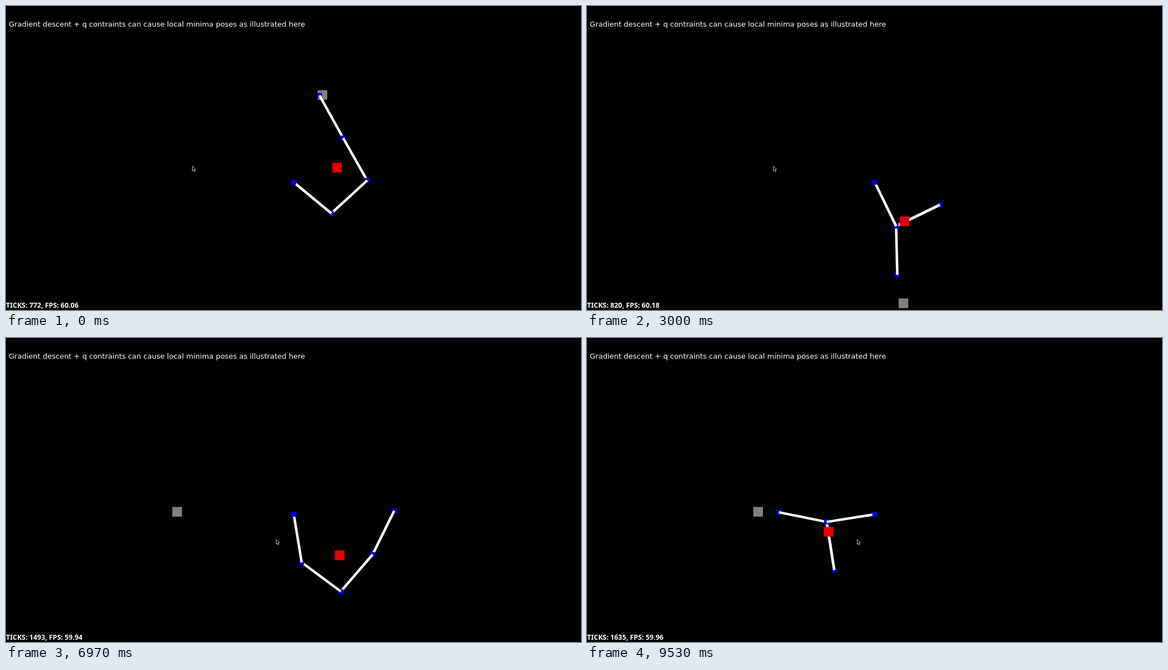
Animation of 1029 by 544 pixels, one loop 9.56 s. Source, as an HTML page with a canvas:

```html
<!DOCTYPE html>
<html lang="en">
<head>
<meta charset="utf-8">
<style>
  html, body { margin: 0; width: 100%; height: 100%; overflow: hidden; background: #000; }
  canvas { display: block; }
</style>
</head>
<body>
<canvas id="stage" width="1029" height="544"></canvas>
<script>
const ctx = document.getElementById('stage').getContext('2d');
const LOOP = 9560, STEP = 100 / 3, CUT = 141, LAST_TICK = 150;
const BASE = [515, 315.5], LINK = 87.2, RAD = Math.PI / 180;
const GAIN = 5.9e-6 / RAD, MAX_TURN = 0.06 / RAD;
const LIMITS = [[-360, 360], [-90, 0], [-180, 0], [-90, 1]];
const GOAL_SPEED = 0.189;
const CAPTION = 'Gradient descent + q contraints can cause local minima poses as illustrated here';

// keys: joint angles in degrees at a few ticks; the solver fills in the rest
const scenes = [
  {
    tick: 772, resume: 66, cursor: [333, 285.5],
    from: [566.3, 159.2], to: [566.3, 532], start: 100,
    keys: [
      { at: 0, q: [39.6, -82.2, -77, 0.6] },
      { at: 10, q: [51.2, -90, -111.7, -33.6] },
      { at: 98, q: [72, -90, -180, -79.3] }
    ]
  },
  {
    tick: 1493, resume: 215, cursor: [483, 359.5],
    from: [693, 311], to: [306.3, 311], start: 4915,
    keys: [
      { at: 0, q: [80.7, -44.1, -85.8, -14.5] },
      { at: 8, q: [75, -71.6, -113.3, -42] },
      { at: 46, q: [149, -90, -180, -38] },
      { at: 142, q: [171, -90, -180, -69.6] }
    ]
  }
];

const mix = (a, b, f) => a + (b - a) * f;
const clamp = (v, lo, hi) => Math.max(lo, Math.min(hi, v));
const limit = q => q.map((v, i) => clamp(v, ...LIMITS[i]));

function armPoints(q) {
  const points = [BASE];
  let angle = 0;
  for (const turn of q) {
    angle += turn * RAD;
    const [x, y] = points[points.length - 1];
    points.push([x + LINK * Math.cos(angle), y + LINK * Math.sin(angle)]);
  }
  return points;
}

// One step of gradient descent on the squared distance from tip to goal
function descend(q, goal) {
  const points = armPoints(q);
  const [tx, ty] = points[4];
  const ex = goal[0] - tx, ey = goal[1] - ty;
  return limit(q.map((v, i) => {
    const [x, y] = points[i];
    const slope = (tx - x) * ey - (ty - y) * ex;
    return v + clamp(slope * GAIN, -MAX_TURN, MAX_TURN);
  }));
}

// Descend from each key and spread the remaining gap to the next one evenly
function solve({ keys, to }) {
  const path = [];
  keys.forEach((key, k) => {
    const next = keys[k + 1];
    const count = (next ? next.at : LAST_TICK) - key.at;
    const run = [key.q];
    for (let i = 0; i < count; i++) run.push(descend(run[i], to));
    const gap = run[count].map((v, j) => next ? next.q[j] - v : 0);
    for (let i = 0; i < count; i++) {
      path.push(limit(run[i].map((v, j) => v + gap[j] * i / count)));
    }
  });
  return path;
}
scenes.forEach(scene => scene.path = solve(scene));

// Mean of the link midpoints
function massCentre(points) {
  return [0, 1].map(n => points.slice(1)
    .reduce((sum, p, i) => sum + (p[n] + points[i][n]) / 2, 0) / 4);
}

function goalAt({ from, to, start }, time) {
  const span = Math.hypot(to[0] - from[0], to[1] - from[1]);
  const f = clamp((time - start) * GOAL_SPEED / span, 0, 1);
  return from.map((v, n) => mix(v, to[n], f));
}

// A slightly noisy reading, refreshed every five steps
function fps(step) {
  const slot = Math.floor(step / 5);
  return (60.06 + 0.12 * Math.sin(slot * 12.9898)).toFixed(2);
}

function square([x, y], size, color) {
  ctx.fillStyle = color;
  ctx.fillRect(x - size / 2, y - size / 2, size, size);
}

// From the tip inwards, each link is covered by the joint it starts from
function drawArm(points) {
  ctx.strokeStyle = '#fff';
  ctx.lineWidth = 4.5;
  for (let i = 4; i >= 0; i--) {
    square(points[i], 8.7, '#0000f0');
    if (i === 0) break;
    ctx.beginPath();
    ctx.moveTo(...points[i - 1]);
    ctx.lineTo(...points[i]);
    ctx.stroke();
  }
}

function label(text, x, y, font) {
  ctx.font = font;
  ctx.fillStyle = '#fff';
  ctx.fillText(text, x, y);
}

const arrow = new Path2D('M.5 .8V9.6L2.5 7.7L3.8 10.8L5.2 10.2L3.9 7.2H6.4Z');

function drawCursor([x, y]) {
  ctx.save();
  ctx.translate(x, y);
  ctx.lineWidth = 1;
  ctx.strokeStyle = '#b8b8b8';
  ctx.stroke(arrow);
  ctx.restore();
}

function draw(time) {
  const step = Math.floor((time + 3.4) / STEP);
  const scene = scenes[step < CUT ? 0 : 1];
  const ticks = Math.max(0, step - scene.resume) * 2;
  const points = armPoints(scene.path[ticks]);

  ctx.fillStyle = '#000';
  ctx.fillRect(0, 0, 1029, 544);
  square(goalAt(scene, step * STEP), 17.3, '#808080');
  drawArm(points);
  square(massCentre(points), 17.3, '#e60000');

  label(CAPTION, 5, 36.5, '13px "DejaVu Sans", sans-serif');
  label(`TICKS: ${scene.tick + ticks}, FPS: ${fps(step)}`, 0, 540,
    'bold 12.4px "Noto Sans", sans-serif');
  drawCursor(scene.cursor);
}

const begin = performance.now();
function frame() {
  draw((performance.now() - begin) % LOOP);
  requestAnimationFrame(frame);
}
frame();
</script>
</body>
</html>
```
